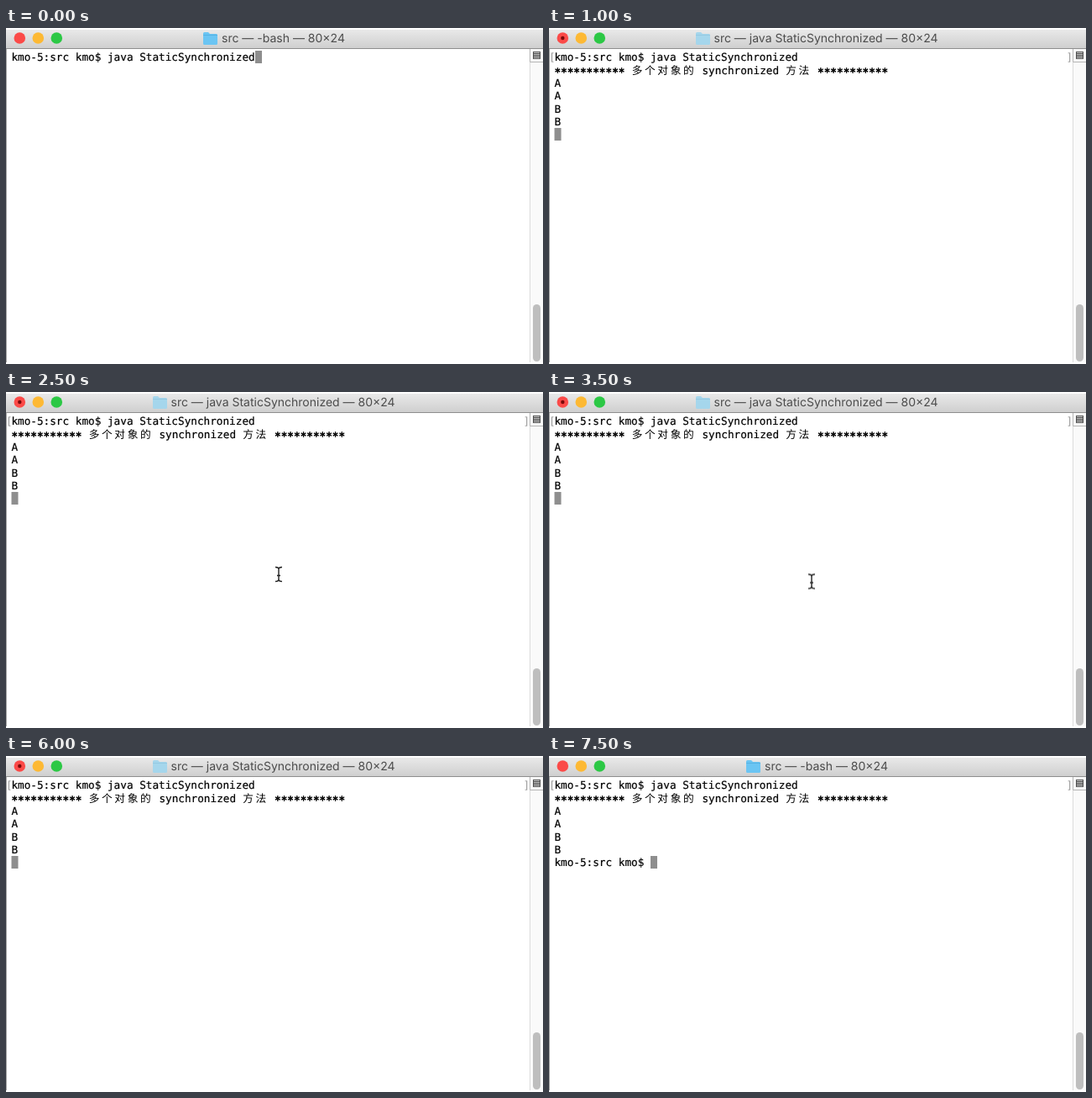
These frames come from a looping animation (640 by 400 pixels, 8 s). An HTML page:

```html
<!DOCTYPE html>
<html lang="zh">
<head>
<meta charset="utf-8">
<title>Terminal</title>
<style>
html, body { margin: 0; width: 100%; height: 100%; overflow: hidden; background: #fff; }
svg { display: block; width: 100vw; height: 100vh; }
text { text-rendering: geometricPrecision; }
.term { font: 12.7px "DejaVu Sans Mono", monospace; fill: #000; stroke: #000; stroke-width: .2px; }
.han { font: 12.7px "Noto Sans CJK SC", "Noto Sans CJK", sans-serif; letter-spacing: 2.6px; stroke: none; }
.stars { stroke-width: .6px; }
.title { font: 14px Inter, sans-serif; fill: #4c4c4c; }
.bracket { fill: #999; stroke: none; }

.idle, .busy, .started, .finished, .late, .block, .pointer {
  animation: 8s step-end infinite;
}
.idle { animation-name: idle; }
.busy { animation-name: busy; }
.started { animation-name: started; }
.late { animation-name: late; }
.finished { animation-name: finished; }
.block { animation-name: block; }
.pointer { animation-name: pointer; }

@keyframes idle { 0%, 93.75% { opacity: 1; } 6.25% { opacity: 0; } 100% { opacity: 1; } }
@keyframes busy { 0%, 93.75% { opacity: 0; } 6.25% { opacity: 1; } 100% { opacity: 0; } }
@keyframes started { 0% { opacity: 0; } 6.25%, 100% { opacity: 1; } }
@keyframes late { 0% { opacity: 0; } 12.5%, 100% { opacity: 1; } }
@keyframes finished { 0% { opacity: 0; } 93.75%, 100% { opacity: 1; } }
@keyframes block {
  0% { transform: translate(297px, 27px); }
  6.25% { transform: translate(6.5px, 88.2px); }
  12.5% { transform: translate(6.5px, 119px); }
  93.75%, 100% { transform: translate(121px, 119px); }
}
@keyframes pointer {
  0% { opacity: 0; transform: translate(325px, 217px); }
  31.25% { opacity: 1; transform: translate(325px, 217px); }
  43.75% { opacity: 1; transform: translate(313px, 225.5px); }
  50% { opacity: 1; transform: translate(305.5px, 226.5px); }
  68.75%, 100% { opacity: 0; transform: translate(305.5px, 226.5px); }
}
</style>
</head>
<body>
<svg viewBox="0 0 640 400">
  <defs>
    <linearGradient id="bar" x2="0" y2="1">
      <stop stop-color="#e9e9e9"/>
      <stop offset="1" stop-color="#cfcfcf"/>
    </linearGradient>
    <path id="folder" d="M0 1.5Q0 0 1.5 0H6L8 2H15.5Q17 2 17 3.5V13.5Q17 15 15.5 15H1.5Q0 15 0 13.5Z"/>
    <path id="ibeam" d="M-4-8.5Q0-8.5 0-6Q0-8.5 4-8.5M0-6.5V6.5M-4 8.5Q0 8.5 0 6Q0 8.5 4 8.5M-2 1.5H2" fill="none"/>
  </defs>

  <rect width="640" height="400" fill="#fff"/>
  <rect y="2" width="640" height="22" fill="url(#bar)"/>
  <rect y="24" width="640" height="1" fill="#8e8e8e"/>
  <rect y="25" width="1" height="373" fill="#a8a8a8"/>

  <circle cx="16.3" cy="12" r="6.8" fill="#fb4a48"/>
  <circle cx="38.3" cy="12" r="6.8" fill="#fdb934"/>
  <circle cx="60.3" cy="12" r="6.8" fill="#2cc845"/>

  <g class="idle">
    <use href="#folder" x="235" y="5" fill="#6bc5f3"/>
    <path d="M235 8.5H252" stroke="#56b2e2"/>
    <text class="title" x="257" y="17.3">src — -bash — 80×24</text>
  </g>
  <g class="busy">
    <circle cx="16.3" cy="12" r="2.2" fill="#7a0a0a"/>
    <use href="#folder" x="175" y="5" fill="#a5d6ec"/>
    <path d="M175 8.5H192" stroke="#95c9e2"/>
    <text class="title" x="196.5" y="17.3">src — java StaticSynchronized — 80×24</text>
  </g>

  <rect x="624" y="25" width="16" height="373" fill="#fafafa"/>
  <path d="M624.5 25V398" stroke="#dcdcdc"/>
  <path d="M624.5 25V40.5H640" fill="none" stroke="#b4b4b4"/>
  <rect x="628.5" y="28.5" width="8" height="8" fill="#ccc" stroke="#555"/>
  <path d="M628 30.5H637M628 32.5H637M628 34.5H637" stroke="#444"/>
  <rect x="628" y="329" width="9" height="68" rx="4.5" fill="#bebebe"/>

  <rect class="block" width="8" height="15" fill="#8e8e8e"/>

  <g class="term">
    <text x="6.4" y="39.3">kmo-5:src kmo$ java StaticSynchronized</text>
    <g class="started">
      <text class="bracket" x="0" y="39.3">[</text>
      <text class="bracket" x="616.5" y="39.3">]</text>
      <text class="stars" x="6.4" y="57">***********</text>
      <text class="han" x="98.8" y="55">多个对象的</text>
      <text x="182.4" y="54.6">synchronized</text>
      <text class="han" x="282.3" y="55">方法</text>
      <text class="stars" x="320.1" y="57">***********</text>
      <text x="6.4" y="70">A</text>
      <text x="6.4" y="85.3">A</text>
    </g>
    <g class="late">
      <text x="6.4" y="100.6">B</text>
      <text x="6.4" y="115.9">B</text>
    </g>
    <text class="finished" x="6.4" y="131.2">kmo-5:src kmo$</text>
  </g>

  <g class="pointer">
    <use href="#ibeam" stroke="#fff" stroke-width="3"/>
    <use href="#ibeam" stroke="#222" stroke-width="1.4"/>
  </g>
</svg>
</body>
</html>
```
